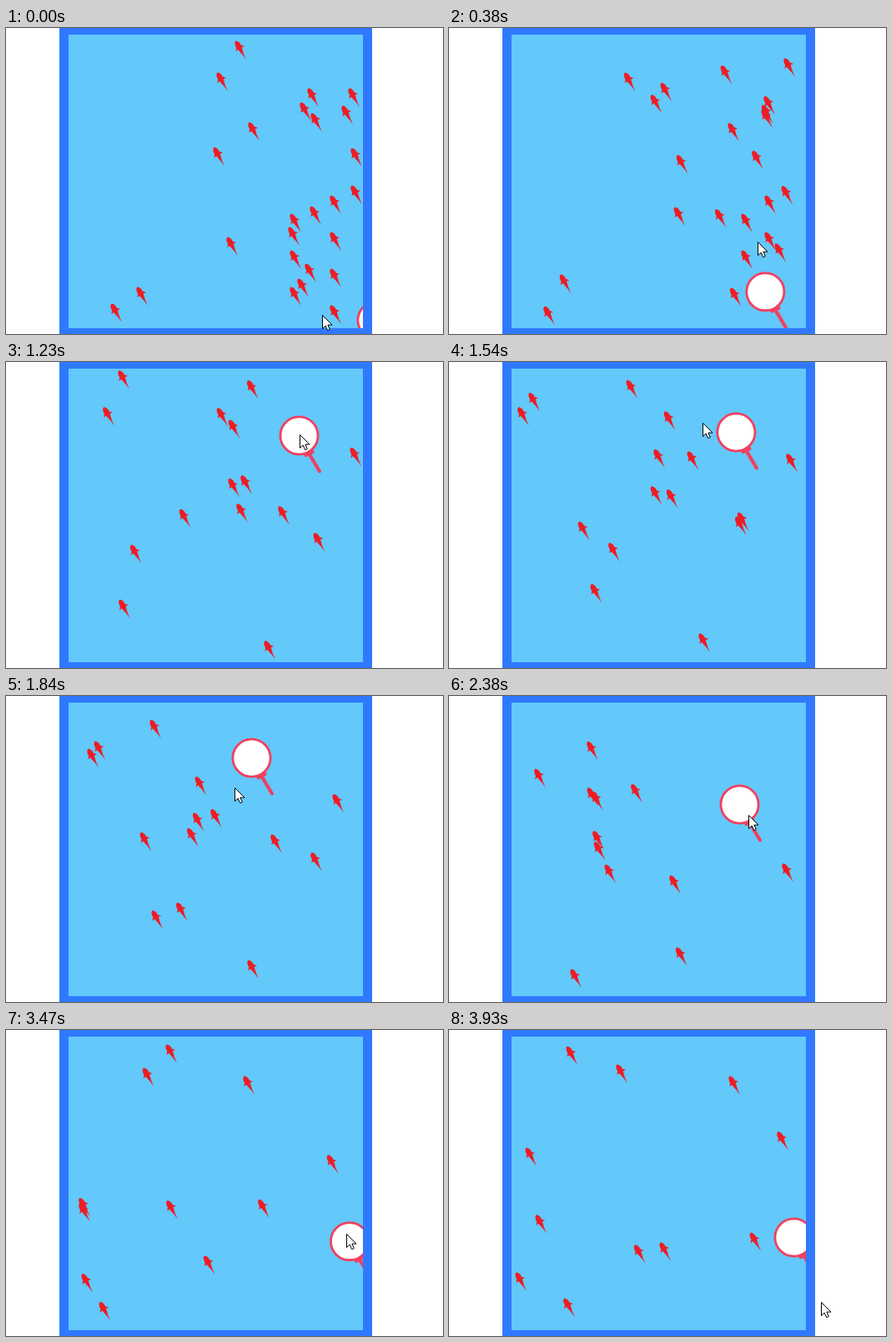
Recreate the animation shown at these times as an HTML page with a canvas. Size 524 by 368 pixels, loop 4.01 s.

```html
<!DOCTYPE html>
<html lang="en">
<head>
<meta charset="utf-8">
<title>Fish pond</title>
<style>
html, body { margin: 0; width: 100%; height: 100%; overflow: hidden; background: #fff; }
canvas { display: block; }
</style>
</head>
<body>
<canvas id="stage" width="524" height="368"></canvas>
<script>
const ctx = document.getElementById('stage').getContext('2d');
const LOOP = 4010, STEPS = 52;
const NET_DELAY = 3; // steps the net trails behind the pointer
const REACH = { x: 27.5, y: 30 };
const RED = '#ee1c24', NET = '#f2405f', POND = '#63c8fa', RIM = '#3079ff';

// Swimmers: start and speed per step; they glide straight and bounce off the rim
const fish = [
  [280, 24, -4.16, 10.1], [258, 62, -8.51, 0.04], [367, 81, 3.2, 1.9],
  [416, 81, 3.6, -7.2], [358, 98, -5.35, -8.88], [408, 102, -5.5, -0.2],
  [371, 111, -6.18, 2.35], [296, 122, -9.75, -6.67], [254, 152, 4.87, 1.87],
  [419, 153, -7.78, -9.35], [419, 198, -10.04, -8.39], [370, 223, 6.86, -4.9],
  [344, 248, -3.88, -4.31], [270, 260, 1.06, -7.2], [364, 292, 6.42, -4.87],
  [355, 310, -2.5, 2.2], [162, 320, -8.61, 4.67], [131, 340, 1.47, -6.98]
].map(([x, y, vx, vy]) => ({ x, y, vx, vy }));

// A zigzag shoal lies in the net's first sweep
for (let i = 0; i < 7; i++) {
  const side = i % 2 ? -1 : 1;
  fish.push({ x: 370 + 24 * side, y: 210 + 22 * i, vx: -2 * side, vy: 0 });
}

// Pointer route [step, x, y]
const route = [[-3, 444, 351], [0, 380, 345], [3, 380, 298], [7, 361, 212], [10, 356, 141],
  [13, 351, 88], [16, 353, 87], [21, 294, 74], [24, 275, 110], [28, 348, 130],
  [31, 360, 143], [36, 395, 211], [39, 411, 255], [48, 413, 249], [51, 447, 327]];

const fishShape = new Path2D(
  'M0-9.6C2.3-9 3.5-5.5 3.2-2.2L6.2 1.2 2.6.8C2 4.5 1.3 6.5.9 9L.3 16' +
  'L-.7 9C-1.2 6.5-1.9 4.5-2.6.8L-6 1.4-3.2-2.2C-3.5-5.5-2.3-9 0-9.6Z');
const arrow = new Path2D('M0 0V16L3.7 12.6 6.2 18.2 8.8 17 6.4 11.6H11.5Z');

function bounce(v, lo, hi) {
  const span = hi - lo;
  const m = (((v - lo) % (2 * span)) + 2 * span) % (2 * span);
  return lo + (m > span ? 2 * span - m : m);
}

function swim(f, step) {
  return [bounce(f.x + f.vx * step, 82.5, 420.5), bounce(f.y + f.vy * step, 17, 344.5)];
}

// Smooth curve through the route
function pointer(step) {
  let i = 0;
  while (i < route.length - 2 && step >= route[i + 1][0]) i++;
  const a = route[i], b = route[i + 1];
  const before = route[i - 1] || a, after = route[i + 2] || b;
  const d = b[0] - a[0], u = (step - a[0]) / d;
  return [1, 2].map(c => {
    const m0 = (b[c] - before[c]) / (b[0] - before[0]) * d;
    const m1 = (after[c] - a[c]) / (after[0] - a[0]) * d;
    const u2 = u * u, u3 = u2 * u;
    return (2 * u3 - 3 * u2 + 1) * a[c] + (u3 - 2 * u2 + u) * m0
      + (3 * u2 - 2 * u3) * b[c] + (u3 - u2) * m1;
  });
}

const netAt = step => pointer(step - NET_DELAY);

function catchStep(f) {
  for (let s = 0; s < STEPS; s++) {
    const [x, y] = swim(f, s), [nx, ny] = netAt(s);
    if (Math.abs(x - nx) < REACH.x && Math.abs(y - ny) < REACH.y) return s;
  }
  return STEPS;
}
for (const f of fish) f.caught = catchStep(f);

function at(x, y, paint) {
  ctx.save();
  ctx.translate(x, y);
  paint();
  ctx.restore();
}

function box(color, x, y, w, h) {
  ctx.fillStyle = color;
  ctx.fillRect(x, y, w, h);
}

function line(x0, y0, x1, y1) {
  ctx.beginPath();
  ctx.moveTo(x0, y0);
  ctx.lineTo(x1, y1);
  ctx.stroke();
}

function drawFish(step) {
  ctx.fillStyle = RED;
  for (const f of fish) {
    if (step >= f.caught) continue;
    at(...swim(f, step), () => {
      ctx.rotate(-0.5);
      ctx.fill(fishShape);
    });
  }
}

function drawNet() {
  ctx.strokeStyle = NET;
  ctx.lineCap = 'round';
  ctx.lineWidth = 4.2;
  line(12, 22, 24.5, 43);
  line(8, 23.5, 16, 19.5);
  ctx.beginPath();
  ctx.arc(0, 0, 22.6, 0, Math.PI * 2);
  ctx.fillStyle = '#fff';
  ctx.fill();
  ctx.lineWidth = 2.8;
  ctx.stroke();
}

function drawPointer() {
  ctx.fillStyle = '#fff';
  ctx.fill(arrow);
  ctx.strokeStyle = '#000';
  ctx.lineWidth = 1;
  ctx.stroke(arrow);
}

function draw(step) {
  box('#fff', 0, 0, 524, 368);
  box(RIM, 64, 0, 375, 368);
  ctx.save();
  ctx.beginPath();
  ctx.rect(75, 8, 353, 353);
  ctx.clip();
  box(POND, 75, 8, 353, 353);
  drawFish(step);
  const [nx, ny] = netAt(step);
  at(nx + 0.5, ny + 0.5, drawNet);
  ctx.restore();
  const [x, y] = pointer(step);
  at(Math.round(x) - 0.5, Math.round(y) + 0.5, drawPointer);
}

const start = performance.now();
function tick() {
  const ms = (performance.now() - start) % LOOP;
  // The small lead absorbs the uneven step lengths
  draw(Math.min(STEPS - 1, Math.floor((ms + 18) * STEPS / LOOP)));
  requestAnimationFrame(tick);
}
tick();
</script>
</body>
</html>
```
